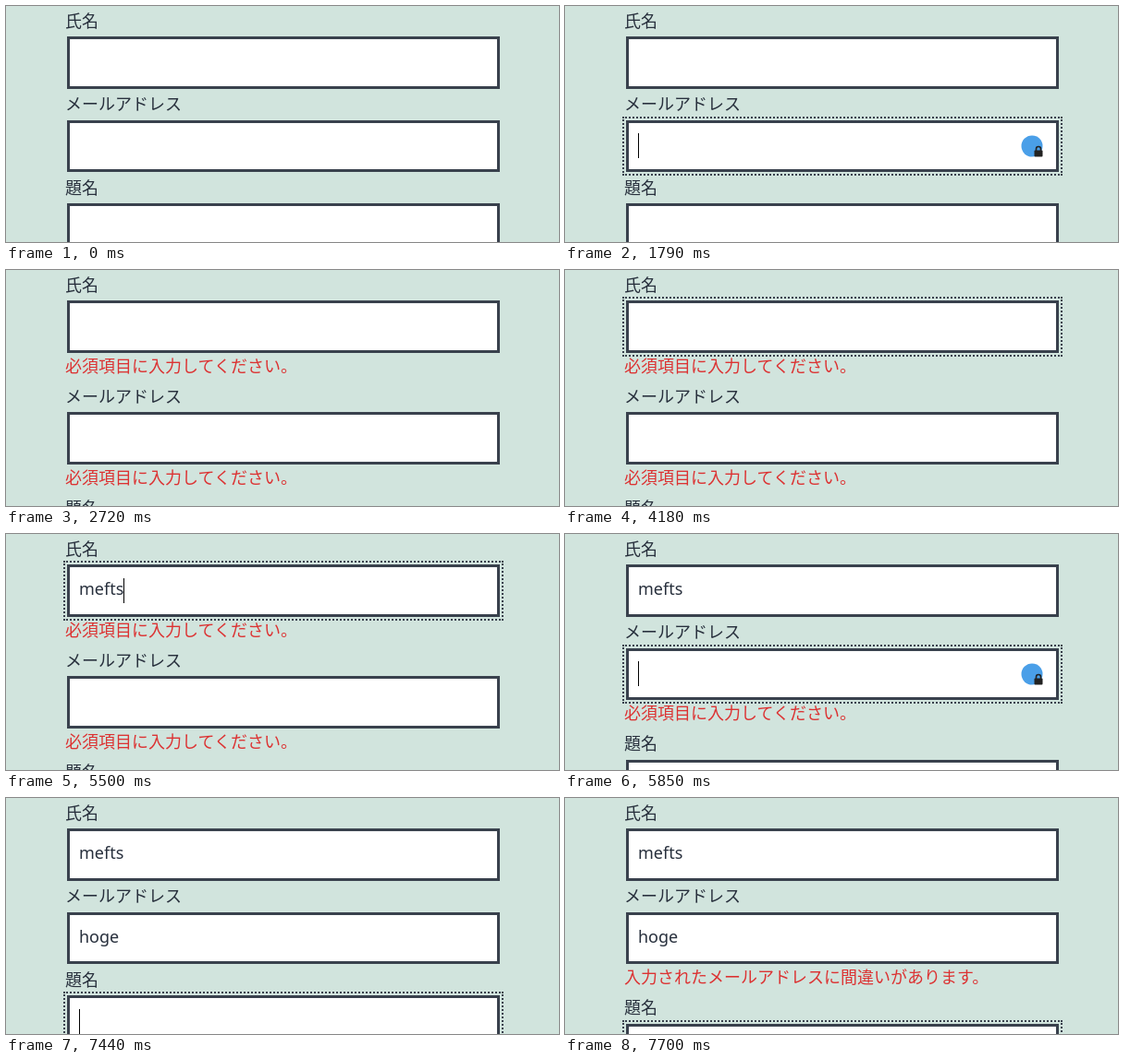
Animation of 598 by 256 pixels, one loop 8 s. Source, as an HTML page:

```html
<!DOCTYPE html>
<html lang="ja">
<head>
<meta charset="utf-8">
<title>Form validation</title>
<style>
html, body { margin: 0; width: 100%; height: 100%; overflow: hidden; background: #d1e4dd; }
body { position: relative; font: 300 18px/20px "Noto Sans CJK JP", "Noto Sans CJK", sans-serif; color: #28303d; }
label, .error, .field { position: absolute; white-space: nowrap; }
label, .error { left: 64px; }
.error { color: #dc3232; }
.field {
  left: 66px; width: 468px; height: 56.5px; box-sizing: border-box; padding-left: 10px;
  display: flex; align-items: center;
  background: #fff; border: 3px solid #39414d;
}
.field.focus { outline: 2px dotted #39414d; outline-offset: 2px; }
.value { position: relative; top: -2.2px; font: 400 18px/24px "Noto Sans", sans-serif; }
.caret { width: 1px; height: 27px; background: #000; }
.icon { position: absolute; left: 423px; top: 12px; width: 28px; height: 28px; }
</style>
</head>
<body>
<script>
const LOOP = 8000, PITCH = 90.6, ERROR_GAP = 30.6;
const REQUIRED = '必須項目に入力してください。';
const INVALID = '入力されたメールアドレスに間違いがあります。';
const ICON = `<svg class="icon" viewBox="0 0 28 28">
  <circle cx="13" cy="13" r="11.5" fill="#4a9fe8"/>
  <path d="M17.5 18v-2a2.5 2.5 0 0 1 5 0v2" fill="none" stroke="#222" stroke-width="1.6"/>
  <rect x="15.5" y="17.5" width="9" height="7" rx="1" fill="#222"/></svg>`;

// Each step changes part of the form state from its time on.
const steps = [
  [0, { focus: -1, caret: false, icon: false, name: '', mail: '', nameError: '', mailError: '' }],
  [720, { focus: 0, caret: true }],
  [1250, { caret: false }],
  [1380, { caret: true }],
  [1730, { focus: 1 }],
  [1790, { icon: true }],
  [1990, { nameError: REQUIRED }],
  [2260, { caret: false }],
  [2460, { focus: 2, caret: true, icon: false }],
  [2720, { mailError: REQUIRED }],
  [3390, { focus: 1, icon: true }],
  [3650, { focus: 0, icon: false }],
  [4180, { caret: false }],
  [4710, { caret: true }],
  [4840, { name: 'me' }],
  [5170, { name: 'mef' }],
  [5320, { name: 'meft' }],
  [5500, { name: 'mefts' }],
  [5850, { focus: 1, icon: true, nameError: '' }],
  [6510, { mail: 'h' }],
  [6640, { mail: 'ho' }],
  [6840, { mail: 'hog' }],
  [6910, { mail: 'hoge' }],
  [7440, { focus: 2, icon: false, mailError: '' }],
  [7700, { mailError: INVALID }],
];

function add(parent, tag, className, text = '') {
  const el = document.createElement(tag);
  el.className = className;
  el.textContent = text;
  return parent.appendChild(el);
}

const rows = ['氏名', 'メールアドレス', '題名'].map(title => {
  const label = add(document.body, 'label', '', title);
  const error = add(document.body, 'div', 'error');
  const field = add(document.body, 'div', 'field');
  const value = add(field, 'span', 'value');
  const caret = add(field, 'i', 'caret');
  return { label, error, field, value, caret };
});
rows[1].field.insertAdjacentHTML('beforeend', ICON);
const icon = document.querySelector('.icon');

function draw(time) {
  const state = {};
  for (const [start, change] of steps) if (start <= time) Object.assign(state, change);
  const values = [state.name, state.mail, ''];
  const errors = [state.nameError, state.mailError, ''];
  let y = 33;
  rows.forEach((row, i) => {
    const focused = state.focus === i;
    row.label.style.top = y - 28.5 + 'px';
    row.field.style.top = y + 'px';
    row.error.style.top = y + 59.5 + 'px';
    row.field.classList.toggle('focus', focused);
    row.value.textContent = values[i];
    row.error.textContent = errors[i];
    row.caret.style.visibility = focused && state.caret ? 'visible' : 'hidden';
    y += PITCH + (errors[i] ? ERROR_GAP : 0);
  });
  icon.style.display = state.icon ? '' : 'none';
}

function tick() {
  draw(performance.now() % LOOP);
  requestAnimationFrame(tick);
}
tick();
</script>
</body>
</html>
```
